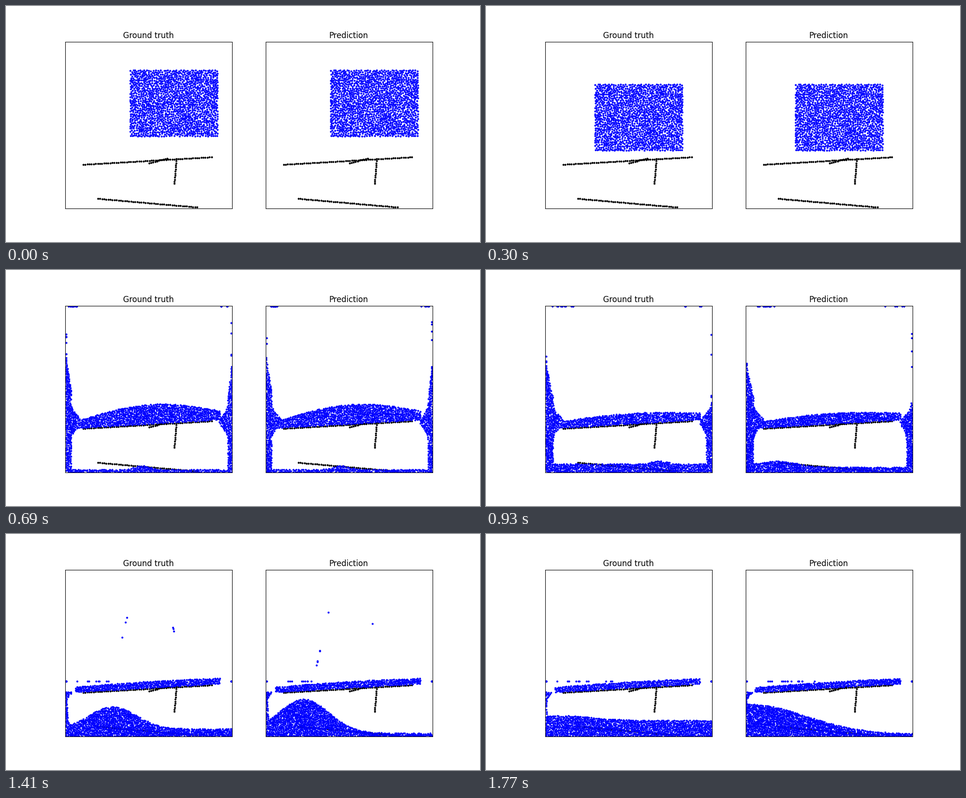
These frames come from a looping animation (1000 px wide and 500 px high, 1800 ms). A matplotlib script:

```python
import numpy as np
import matplotlib.pyplot as plt
from matplotlib.animation import FuncAnimation

FRAMES, INTERVAL = 60, 30
N, STRIP = 1500, 30          # water particles, particles per matching strip
LEFT, RIGHT, TOP, BOTTOM = 125, 477.27, 76.36, 428.64
HIT = 11                     # frame at which the block meets the shelf
GRAVITY = 3.0                # pixels per frame squared
CENTRE, HALF = 298.5 + 328j, 136 + 8j
KEYS = (15, 19, 23, 31, 47, 59)

# Wall streams at the key frames: top edge and thickness.
LEFT_WALL = (290, 110, 185, 200, 335, 335), (4, 8, 11, 15, 6, 4)
RIGHT_WALL = (248, 85, 205, 280, 428, 428), (4, 7, 8, 11, 0, 0)

# Floor pool: frame, base depth, wave height, wave position, wave width.
TRUE_POOL = ((15, 0, 0, 288, 25), (23, 5, 8, 288, 25), (31, 17, 6, 365, 25),
             (47, 15, 47, 225, 70), (59, 33, 10, 160, 90))
GUESS_POOL = ((15, 0, 0, 288, 25), (23, 5, 8, 285, 25), (31, 10, 13, 190, 60),
              (47, 6, 72, 205, 75), (59, 4, 64, 130, 170))


def shelf_y(x):
    return 336 - (x - 163) * 16 / 271


def inside(p):
    return np.clip(p.real, 126.5, 476) + 1j * np.clip(p.imag, 77.5, 428)


def layer(x, y, t):
    """Dome of water that sinks into a thin sheet on the shelf."""
    edge = 12 + 10 * np.exp((15 - t) / 12)
    peak = 14 + 83 * np.exp((15 - t) / 7.5)
    crown = np.cos(np.clip((x - 308) / 310, -0.5, 0.5) * np.pi)
    rise = shelf_y(x) - y
    return ((np.abs(x - 298.5) < 153) & (rise > 2)
            & (rise < edge + (peak - edge) * crown))


def stream(gap, y, t, wall, bulge):
    """Water on a side wall, thickest where the shelf feeds it."""
    top, base = (np.interp(t, KEYS, row) for row in wall)
    thick = (base * np.clip((y - top) / 70, 0.15, 1)
             + bulge * np.exp(-((y - 321) / 19) ** 2))
    return (gap < thick) & (y > top) & (y < 375 + 25 * (t - 15))


def pool(x, y, t, keys):
    frame, *rows = np.transpose(keys)
    base, wave, at, width = (np.interp(t, frame, row) for row in rows)
    return 428 - y < base + wave * np.exp(-((x - at) / width) ** 2)


def wet(x, y, t, keys):
    return (layer(x, y, t) | pool(x, y, t, keys)
            | stream(x - 126, y, t, LEFT_WALL, 22)
            | stream(476 - x, y, t, RIGHT_WALL, 18))


def scatter(rng, mask):
    """N evenly spaced points in a region, by farthest-point picking."""
    x, y = rng.uniform(126, 476.5, 60000), rng.uniform(77, 428.5, 60000)
    keep = mask(x, y)
    p = x[keep] + 1j * y[keep]
    picks, dist = [0], np.abs(p - p[0])
    while len(picks) < N:
        picks.append(dist.argmax())
        dist = np.minimum(dist, np.abs(p - p[picks[-1]]))
    return p[picks]


# Elliptic coordinates around the shelf let paths bend round its two ends.
def unroll(z):
    w = np.arccosh(z)
    return w - 2j * np.pi * (w.imag > np.pi / 2)


def to_flow(p):
    z = np.conj(p - CENTRE) / HALF
    flat = z.real + 1j * np.where(z.imag > 0, 0.15 * z.imag, z.imag)
    return unroll(z), unroll(flat).imag


def from_flow(w):
    w = np.maximum(w.real, 0.015) + 1j * w.imag
    return inside(CENTRE + np.conj(np.cosh(w) * HALF))


def strips(order, w):
    rows = order.reshape(-1, STRIP)
    rank = np.argsort(w.real[rows], axis=1)
    return np.take_along_axis(rows, rank, 1).ravel()


def follow(w, s, p):
    """Give each particle its place in the next layout p."""
    w2, s2 = to_flow(p)
    order = np.argsort(s2)
    turns = 2 * np.pi * np.arange(-1, 2)[:, None]
    ring_s = (s2[order] + turns).ravel()
    ring_w = (w2[order] + 1j * turns).ravel()
    start = np.argsort(s)
    k = min(range(N // 2, 3 * N // 2),
            key=lambda k: np.abs(ring_s[k:k + N] - s[start]).sum())
    a, b = strips(start, w), strips(np.arange(k, k + N), ring_w)
    w_next, s_next = np.empty_like(w), np.empty_like(s)
    w_next[a], s_next[a] = ring_w[b], ring_s[b]
    return w_next, s_next


def falling(f):
    """Thrown block in free flight."""
    p = BLOCK - 3.2 * f + 1j * (GRAVITY / 2 * f * f - 12 * f)
    return p.real + 1j * np.minimum(p.imag, shelf_y(p.real) - 2)


def track(rng, keys):
    times = np.array((HIT,) + KEYS, float)
    w, s = to_flow(falling(HIT))
    path = [w]
    for t in KEYS:
        w, s = follow(w, s, scatter(rng, lambda x, y: wet(x, y, t, keys)))
        path.append(w)
    path = np.array(path)
    return times, path, np.gradient(path, times, axis=0)


def body(trk, f):
    if f <= HIT:
        return falling(f)
    times, w, v = trk
    j = min(np.searchsorted(times, f, "right") - 1, len(times) - 2)
    h = times[j + 1] - times[j]
    u = (f - times[j]) / h
    return from_flow((1 + 2 * u) * (1 - u) ** 2 * w[j]
                     + u * (1 - u) ** 2 * h * v[j]
                     + u * u * (3 - 2 * u) * w[j + 1]
                     + u * u * (u - 1) * h * v[j + 1])


def spray(speed, f):
    """Drops shot up the walls; the fast ones slide along the ceiling."""
    if f < KEYS[0]:
        return np.array([], complex)
    t = np.minimum(f - 14, 2 * speed / GRAVITY)
    y = 312 - speed * t + GRAVITY / 2 * t * t
    drift = np.maximum(speed - 36, 0) / 4 * np.maximum(t - 4, 0)
    on_left = np.arange(len(speed)) % 3 > 0
    return inside(np.where(on_left, 127 + drift, 475 - drift) + 1j * y)


def beads(a, b):
    return np.linspace(a, b, round(abs(b - a) / 4.37) + 1)


BLOCK = scatter(np.random.default_rng(5),
                lambda x, y: (abs(x - 354) < 92) & (abs(y - 206) < 70))
WALLS = np.concatenate([beads(163 + 336j, 433.5 + 320j),
                        beads(302 + 333j, 340 + 323j),
                        beads(359.5 + 324j, 355 + 376.4j),
                        beads(194 + 408j, 403 + 426.4j)])

fig, axes = plt.subplots(1, 2, figsize=(10, 5), dpi=100)
panels = []
for ax, title, keys, seed in zip(axes, ("Ground truth", "Prediction"),
                                 (TRUE_POOL, GUESS_POOL), (1, 2)):
    ax.set_title(title, x=0.498)
    ax.set_xlim(LEFT, RIGHT)
    ax.set_ylim(BOTTOM, TOP)
    ax.set_xticks([])
    ax.set_yticks([])
    ax.set_aspect(1)
    ax.plot(WALLS.real, WALLS.imag, "o", ms=2, color="black")
    line, = ax.plot([], [], "o", ms=2, color="blue")
    rng = np.random.default_rng(seed)
    panels.append((line, track(rng, keys), rng.uniform(28, 54, 26)))


def update(f):
    for line, trk, speed in panels:
        p = np.concatenate([body(trk, f), spray(speed, f)])
        line.set_data(p.real, p.imag)
    return [panel[0] for panel in panels]


anim = FuncAnimation(fig, update, frames=FRAMES, interval=INTERVAL,
                     repeat=True, repeat_delay=0)
plt.show()
```
